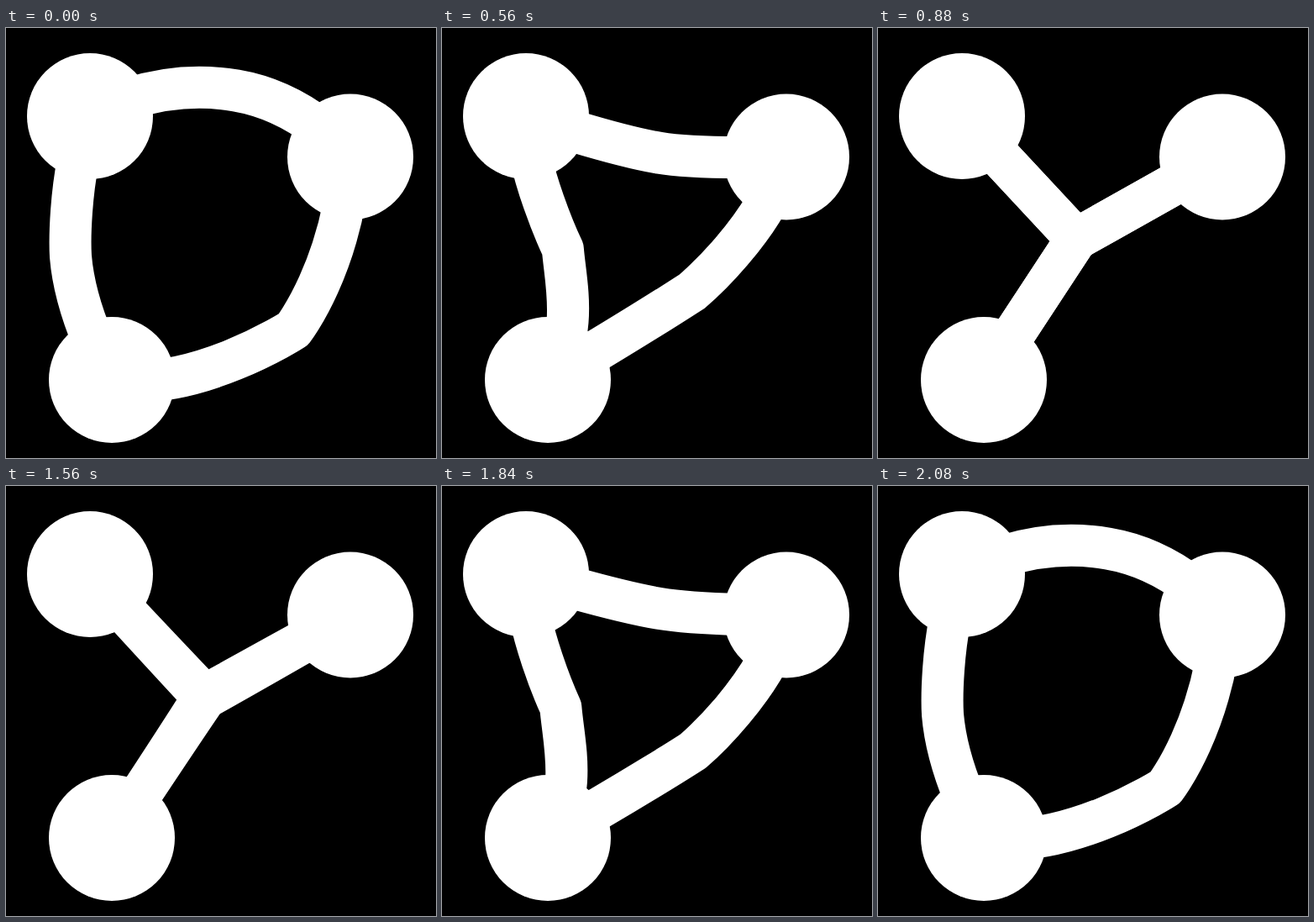
These frames come from a looping animation (512x512 px, 2.44 s). An HTML page:

```html
<!DOCTYPE html>
<html lang="en">
<head>
<meta charset="utf-8">
<title>Ring and hub</title>
<style>
  html, body { margin: 0; width: 100%; height: 100%; overflow: hidden; background: #000; }
  svg { display: block; width: 100%; height: 100%; }
</style>
</head>
<body>
<svg viewBox="0 0 512 512">
  <g id="nodes" fill="#fff"></g>
  <g id="links" fill="none" stroke="#fff" stroke-width="50" stroke-linejoin="round"></g>
</svg>
<script>
const LOOP = 2440, STEP = 40, MOVE_STEPS = 14;
const COLLAPSE_AT = 7.75, EXPAND_AT = 38.1;

const point = (x, y) => ({ x, y, toString: () => `${x} ${y}` });
const mix = (a, b, k) => point(a.x + (b.x - a.x) * k, a.y + (b.y - a.y) * k);

const hub = point(236.2, 251.2);
const left = point(100, 105), right = point(410, 153.5), bottom = point(126, 419);

function addShape(parent, name, attributes = {}) {
  const shape = document.createElementNS("http://www.w3.org/2000/svg", name);
  for (const key in attributes) shape.setAttribute(key, attributes[key]);
  return document.getElementById(parent).appendChild(shape);
}

// Half a link: returns its two curve controls, node side first, for hub amount k.
// The ring bends towards a corner; reach is how far the node's handle
// extends along its spoke when collapsed.
const bendAtNode = (node, corner, joint, reach) => k =>
  [mix(corner, mix(node, hub, reach), k), mix(joint, hub, k)];
const bendAtJoint = (node, corner, joint, reach) => k =>
  [mix(node, hub, reach * k), mix(corner, hub, k)];

function makeLink(from, joint, to, first, second) {
  const path = addShape("links", "path");
  const start = first.bend(from, first.corner, joint, first.reach);
  const end = second.bend(to, second.corner, joint, second.reach);
  return k => path.setAttribute("d",
    `M${from}C${start(k).join(" ")} ${mix(joint, hub, k)}C${end(k).reverse().join(" ")} ${to}`);
}

const half = (bend, corner, reach) => ({ bend, corner, reach });

const links = [
  makeLink(left, point(274, 74.5), right,
    half(bendAtJoint, point(174, 57.5), 0), half(bendAtJoint, point(359, 89), 0)),
  makeLink(left, point(77, 272), bottom,
    half(bendAtNode, point(72, 185), .25), half(bendAtJoint, point(83, 345), .8)),
  makeLink(right, point(342, 359), bottom,
    half(bendAtNode, point(400, 285), .25), half(bendAtNode, point(226, 434), 1))
];

for (const { x, y } of [left, right, bottom]) addShape("nodes", "circle", { cx: x, cy: y, r: 75 });

function ease(step, start) {
  const x = Math.min(1, Math.max(0, (step - start) / MOVE_STEPS));
  return x * x * (3 - 2 * x);
}

function draw(now) {
  const step = Math.floor((now % LOOP) / STEP + 1e-6);
  const k = ease(step, COLLAPSE_AT) - ease(step, EXPAND_AT);
  links.forEach(update => update(k));
  requestAnimationFrame(draw);
}
draw(performance.now());
</script>
</body>
</html>
```
